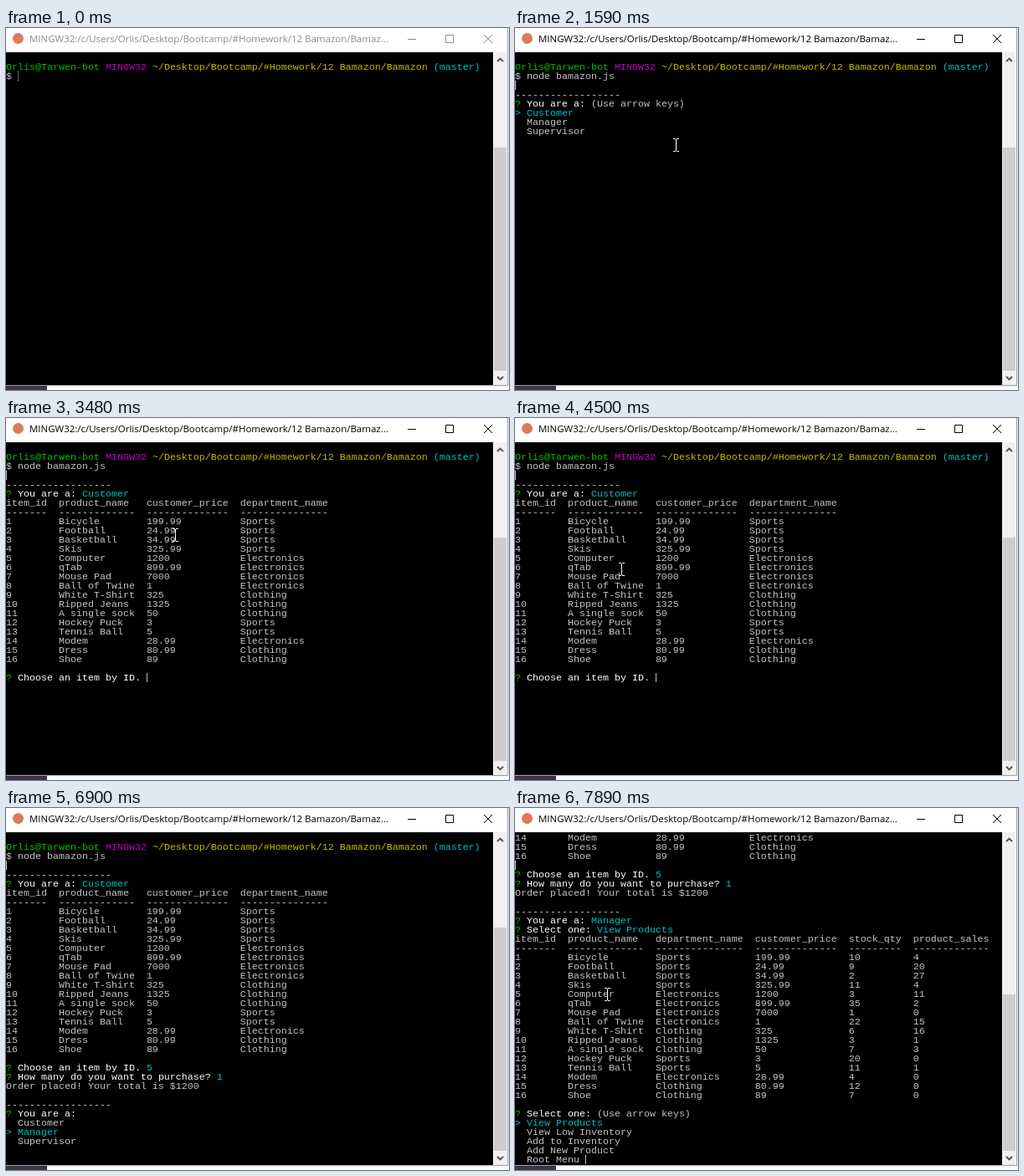
An HTML page for the animation above (7.99 s loop, 601 by 433 pixels).

```html
<!DOCTYPE html>
<html lang="en">
<head>
<meta charset="utf-8">
<title>Terminal</title>
<style>
  html, body { margin: 0; width: 100%; height: 100%; overflow: hidden; background: #fff; }
  body * { position: absolute; }
  #desk { left: 0; top: 427px; width: 49px; height: 6px; background: #41344a; }
  #window { left: 0; top: 0; width: 599px; height: 427px; background: #fff; box-shadow: 0 0 0 1px #a0a0a0, 0 0 4px #0004; }
  #title { left: 28px; top: 5px; font: 11.47px/16px "Open Sans", sans-serif; white-space: pre; color: #000; }
  #icon { left: 8px; top: 6px; width: 13px; height: 13px; border-radius: 50%; background: #dc7a5a; }
  #term { left: 0; top: 29px; width: 582px; height: 398px; background: #000; overflow: hidden; }
  #text { margin: 0; left: 0; top: 2px; font: 11.667px/11px "Liberation Mono", monospace; color: #c4c4c4; }
  #text span { position: static; }
  .g { color: #00bf00; } .m { color: #bf00bf; } .y { color: #bfbf00; }
  .c { color: #00bfbf; } .w { color: #fff; }
  .bar { height: 11px; border-left: 1px solid #bfbfbf; }
  #scroll { left: 582px; top: 29px; width: 16px; height: 398px; background: #f0f0f0; }
  #thumb { left: 1px; width: 15px; bottom: 17px; background: #cdcdcd; }
  svg { left: 0; top: 0; fill: none; }
  #buttons { stroke: #000; }
  .idle #title { color: #8c8c8c; }
  .idle #buttons { stroke: #8c8c8c; }
  .idle .bar { border-left-style: dotted; }
</style>
</head>
<body>
<div id="desk"></div>
<div id="window">
  <div id="icon"></div>
  <div id="title">MINGW32:/c/Users/Orlis/Desktop/Bootcamp/#Homework/12 Bamazon/Bamaz...</div>
  <div id="term">
    <pre id="text"></pre>
    <div id="caret" class="bar"></div>
    <div id="stale" class="bar" style="left:0;top:34px"></div>
  </div>
  <div id="scroll"><div id="thumb"></div></div>
</div>
<svg width="601" height="433">
  <path id="buttons" d="M480 13.5h10M525.5 8.5h9v9h-9zM571 8l10 10M581 8l-10 10"/>
  <path stroke="#505050" stroke-width="1.8" d="M587 40l3.5-3.5L594 40M587 417l3.5 3.5L594 417"/>
</svg>
<svg id="mouse" width="9" height="16">
  <path stroke="#fff" d="M1 .5h3m1 0h3M4.5 1v14M1 15.5h3m1 0h3"/>
</svg>
<script>
const LOOP = 7990, ROWS = 36, CW = 7, LH = 11;
const $ = id => document.getElementById(id);
const ink = (color, s) => `<span class="${color}">${s}</span>`;

const stock = `item_id,product_name,customer_price,department_name,stock_qty,product_sales
1,Bicycle,199.99,Sports,10,4
2,Football,24.99,Sports,9,20
3,Basketball,34.99,Sports,2,27
4,Skis,325.99,Sports,11,4
5,Computer,1200,Electronics,3,11
6,qTab,899.99,Electronics,35,2
7,Mouse Pad,7000,Electronics,1,0
8,Ball of Twine,1,Electronics,22,15
9,White T-Shirt,325,Clothing,6,16
10,Ripped Jeans,1325,Clothing,3,1
11,A single sock,50,Clothing,7,3
12,Hockey Puck,3,Sports,20,0
13,Tennis Ball,5,Sports,11,1
14,Modem,28.99,Electronics,4,0
15,Dress,80.99,Clothing,12,0
16,Shoe,89,Clothing,7,0`.split('\n').map(line => line.split(','));

function table(...cols) {
  const rows = stock.map(r => cols.map(c => r[c]));
  const widths = cols.map((_, i) => Math.max(...rows.map(r => r[i].length)));
  rows.splice(1, 0, widths.map(w => '-'.repeat(w)));
  return rows.map(r => r.map((s, i) => s.padEnd(widths[i])).join('  ').trimEnd());
}

const ask = (q, a) => `${ink('g', '?')} ${ink('w', q)} ${a}`;
const answer = (q, a) => ask(q, ink('c', a));
const menu = (q, items, pick = 0, hint = '(Use arrow keys)') => [
  ask(q, hint),
  ...items.map((s, i) => i === pick ? ink('c', '&gt; ' + s) : '  ' + s),
];

const rule = '-'.repeat(18);
const role = 'You are a:', byId = 'Choose an item by ID.';
const amount = 'How many do you want to purchase?', task = 'Select one:';
const roles = ['Customer', 'Manager', 'Supervisor'];
const tasks = ['View Products', 'View Low Inventory', 'Add to Inventory', 'Add New Product', 'Root Menu '];
const prompt = [ink('g', 'Orlis@Tarwen-bot'), ink('m', 'MINGW32'),
  ink('y', '~/Desktop/Bootcamp/#Homework/12 Bamazon/Bamazon'), ink('c', '(master)')].join(' ');
const shopTable = table(0, 1, 2, 3), stockTable = table(0, 1, 3, 2, 4, 5);

// the whole session log at time t
function log(t) {
  const out = ['', prompt, '$ ' + (t < 830 ? '' : 'node bamazon.js')];
  if (t < 1090) return out;
  out.push('');
  if (t < 1300) return out;
  out.push(rule);
  if (t < 2280) return out.concat(menu(role, roles));
  out.push(answer(role, 'Customer'), ...shopTable, '');
  if (t < 4850) return out.concat(ask(byId, t < 4750 ? '' : '5'));
  out.push(answer(byId, '5'));
  if (t < 5300) return out.concat(ask(amount, t < 5200 ? '' : '1'));
  out.push(answer(amount, '1'), 'Order placed! Your total is $1200', '', rule);
  if (t < 6900) return out.concat(menu(role, roles));
  if (t < 7160) return out.concat(menu(role, roles, 1, ''));
  out.push(answer(role, 'Manager'));
  if (t < 7360) return out.concat(menu(task, tasks));
  out.push(answer(task, 'View Products'), ...stockTable, '');
  return out.concat(menu(task, tasks));
}

// pointer strokes through evenly timed points; typing hides the pointer
const strokes = [
  { from: 100, step: 540, until: 830, path: [[300, 330], [71, 83]] },
  { from: 1490, step: 100, until: 2280, path: [[71, 92], [191, 140], [253, 153]] },
  { from: 2480, step: 505, until: 4750, path: [[240, 153], [340, 351], [200, 136], [8, 170], [127, 181]] },
  { from: 5450, step: 255, until: 6900, path: [[127, 199], [215, 240], [300, 285], [310, 320], [230, 341], [212, 291]] },
  { from: 7460, step: 430, until: LOOP, path: [[212, 291], [110, 223]] },
];

function pointer(t) {
  const s = strokes.find(s => t >= s.from && t < s.until);
  if (!s) return null;
  const k = Math.min((t - s.from) / s.step, s.path.length - 1);
  const i = Math.floor(k), a = s.path[i], b = s.path[i + 1] || a;
  return a.map((v, j) => Math.round(v + (b[j] - v) * (k - i)));
}

const show = (id, on) => $(id).style.visibility = on ? 'visible' : 'hidden';
function place(id, x, y) {
  $(id).style.left = x + 'px';
  $(id).style.top = y + 'px';
}

let shown;
function draw(t) {
  document.body.className = t < 200 ? 'idle' : '';
  const lines = log(t), scroll = Math.max(0, lines.length - ROWS);
  const html = lines.slice(scroll).join('\n');
  if (html !== shown) $('text').innerHTML = shown = html;
  $('thumb').style.top = Math.round(114 + 3.8 * scroll) + 'px';

  // the caret follows the last line; it blinks at the item question only
  const last = lines[lines.length - 1].replace(/<.*?>/g, '');
  const blinkOff = t < 5300 && (t - 2280) % 1060 >= 530;
  place('caret', last.length * CW, 1 + (lines.length - 1 - scroll) * LH);
  show('caret', !last.endsWith(roles[2]) && !blinkOff);
  show('stale', t >= 1090);

  const at = pointer(t);
  show('mouse', at);
  if (at) place('mouse', at[0] - 4, at[1] - 8);
}

const begin = performance.now();
function tick() {
  draw((performance.now() - begin) % LOOP);
  requestAnimationFrame(tick);
}
tick();
</script>
</body>
</html>
```
